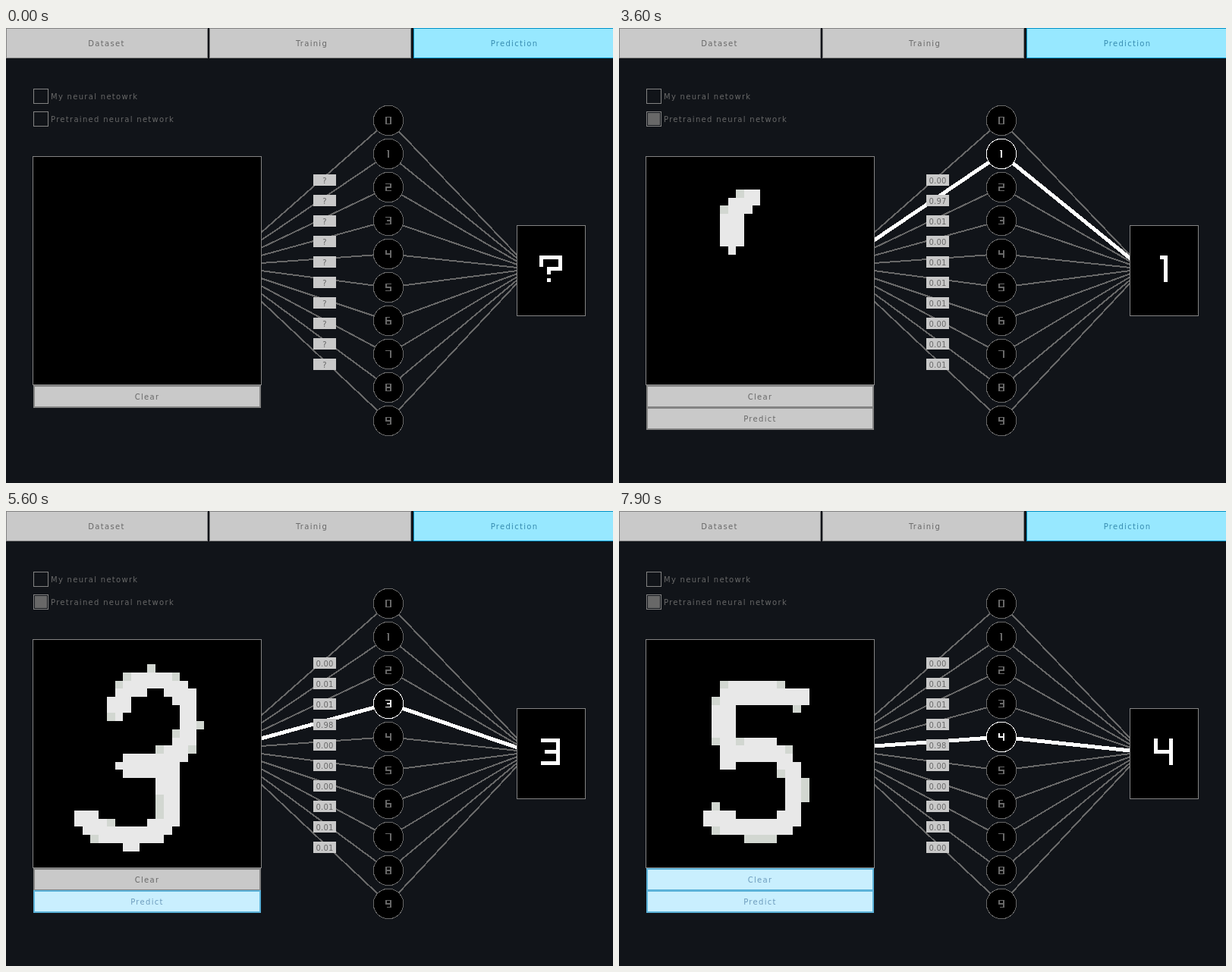
An HTML page with a canvas that plays this animation: 800 by 600 pixels, repeating every 8000 ms.

```html
<!DOCTYPE html>
<html lang="en">
<head>
<meta charset="utf-8">
<title>Digit prediction</title>
<style>
  html, body { margin: 0; width: 100%; height: 100%; overflow: hidden; background: #111419; }
  svg, canvas { position: absolute; left: 0; top: 0; display: block; }
  canvas { left: 36px; top: 170px; }
  text { font: 10px "DejaVu Sans", sans-serif; letter-spacing: 1.3px; fill: #686868; }
  .value { letter-spacing: 0.2px; }
  .mid { text-anchor: middle; }
  .control rect { fill: #c9c9c9; stroke: #838383; }
  .control.active rect { fill: #97e8ff; stroke: #0492c7; }
  .control.active text { fill: #368baf; }
  .control.hot rect { fill: #c9effe; stroke: #5bb2d9; }
  .hot text { fill: #6c9bbc; }
  .check .frame { fill: none; stroke: #838383; }
  .check .mark { fill: #686868; }
  .check.hot .frame { stroke: #5bb2d9; }
  .check.hot .mark { fill: #6c9bbc; }
  .panel { fill: #000; stroke: #838383; }
  .edge { fill: none; stroke: #686868; stroke-width: 2; }
  .edge.on { stroke: #fff; stroke-width: 5; }
  .node { fill: #000; stroke: #686868; }
  .glyph { fill: none; stroke: #686868; stroke-width: 1; }
  .on .node, .on .glyph, .result { stroke: #fff; }
  .tag { fill: #c9c9c9; }
</style>
</head>
<body>
<svg id="stage" width="800" height="600" viewBox="0 0 800 600" shape-rendering="crispEdges"></svg>
<canvas id="pad" width="300" height="300"></canvas>
<script>
const LOOP = 8000, STEP = 100, GRID = 28;
const stage = document.getElementById('stage');
const pen = document.getElementById('pad').getContext('2d');

// Square letterforms on a grid seven units high.
const GLYPHS = {
  0: 'M.5 .5H4.5V6.5H.5Z',
  1: 'M1 .5H2.5V7',
  2: 'M0 .5H4.5V3.5H.5V6.5H5',
  3: 'M0 .5H4.5V6.5H0M1 3.5H4.5',
  4: 'M.5 0V3.5H4.5M4.5 0V7',
  5: 'M5 .5H.5V3.5H4.5V6.5H0',
  6: 'M4 .5H.5V6.5H4.5V3.5H.5',
  7: 'M0 .5H4.5V7',
  8: 'M.5 .5H4.5V6.5H.5ZM.5 3.5H4.5',
  9: 'M4.5 3.5H.5V.5H4.5V6.5H1',
  '?': 'M.5 3V.5H5.5V3.5H2.5V5M2.5 6V7'
};

// Pen paths in grid cells; values are the outputs in hundredths.
const ROUNDS = [
  { draw: 1200, steps: 8, ease: 1, predict: 2100, erase: 2400,
    values: [98, 0, 1, 0, 0, 1, 1, 0, 1, 1],
    path: 'M11.4 6.5L10 6.8L8.5 8L7.3 10L7 13L7 17L7.7 18.8L9 20.2L11 21L17 21.2L19 20L20.5 18.4L21.2 15.5L21 11.5L19.5 8.5L16 6.5L12.5 6.2' },
  { draw: 2600, steps: 4, ease: 1, predict: 3100, erase: 3300,
    values: [0, 97, 1, 0, 1, 1, 1, 0, 1, 1],
    path: 'M11 9L14.5 6L14.5 22' },
  { draw: 3500, steps: 8, ease: 1.4, predict: 4400, erase: 4600,
    values: [0, 1, 99, 0, 1, 1, 1, 1, 0, 0],
    path: 'M10 9.8L10 7L11 5.6L12.1 4.8L15 4.3L17.5 5.5L18.3 8.5L16.5 13L12 18.5L9 21.5L20 21.5' },
  { draw: 4800, steps: 7, ease: 1, predict: 5600, erase: 5800,
    values: [0, 1, 1, 98, 0, 0, 0, 1, 1, 1],
    path: 'M9.8 8L10 7.2L11.5 5.3L14 4.3L16 4.8L18 6.2L18.5 8L18.65 10L18 12L16.6 14L11 15L15.8 15.3L16 17.5L16.4 20L16.2 21.8L15 23L11.5 23.9L8 23.1L6 21.6' },
  { draw: 6000, steps: 7, ease: 1, predict: 6800, erase: 7000,
    values: [0, 1, 1, 1, 98, 0, 0, 0, 1, 0],
    path: 'M10 6.3L9 14L19 14.3M17 6.3L16.5 23' },
  { draw: 7200, steps: 8, ease: 1, predict: 8000, erase: 8000, values: [],
    path: 'M18.2 6.7L16 6.3L14 6L9.5 6.1L9 8L9.1 11L9.6 14L12 13L14 12.7L16 13.8L17.2 15.5L17.65 17L17.6 20L17 21.8L15 22.7L12 22.7L9 22L7.8 21.3' }
];

const HOVER = {
  check: [[400, 900]],
  predict: [[2000, 2300], [3000, 3200], [4300, 4500], [5500, 5700], [6700, 6900], [7900, 8000]],
  clear: [[2300, 2600], [3200, 3400], [4500, 4700], [5700, 5900], [6900, 7100], [7900, 8000]]
};

function add(name, attrs, parent = stage, content = '') {
  const el = document.createElementNS('http://www.w3.org/2000/svg', name);
  for (const key in attrs) el.setAttribute(key, attrs[key]);
  el.textContent = content;
  if (parent) parent.appendChild(el);
  return el;
}

function control(x, y, width, height, border, label, labelX, kind = '') {
  const g = add('g', { class: 'control ' + kind });
  add('rect', { x: x + border / 2, y: y + border / 2, width: width - border,
    height: height - border, 'stroke-width': border }, g);
  add('text', { x: labelX, y: y + height / 2 + 4, class: 'mid' }, g, label);
  return g;
}

function checkbox(y, label) {
  const g = add('g', { class: 'check' });
  add('rect', { x: 36.5, y: y + .5, width: 19, height: 19, class: 'frame' }, g);
  const mark = add('rect', { x: 38, y: y + 2, width: 16, height: 16, class: 'mark', visibility: 'hidden' }, g);
  add('text', { x: 59, y: y + 14 }, g, label);
  return { g, mark };
}

function glyph(char, x, y, size, parent, kind = '') {
  return add('path', { d: GLYPHS[char], class: 'glyph ' + kind, 'aria-label': char,
    transform: `translate(${x} ${y}) scale(${size})` }, parent);
}

control(0, 0, 266, 40, 1, 'Dataset', 132.5);
control(268, 0, 266, 40, 1, 'Trainig', 403);
control(537, 0, 266, 40, 1, 'Prediction', 670, 'active');
checkbox(80, 'My neural netowrk');
const trained = checkbox(110, 'Pretrained neural network');

const edges = [], nodes = [], tags = [];
for (let i = 0; i < 10; i++) {
  edges.push(add('path', { d: `M336 ${270 + 10 * i}L504 ${122 + 44 * i}L674 ${300 + 4 * i}`, class: 'edge' }));
}
const glowEdge = add('path', { class: 'edge on' });
for (let i = 0; i < 10; i++) {
  const g = add('g', {}), y = 122 + 44 * i;
  add('circle', { cx: 504, cy: y, r: 19.8, class: 'node' }, g);
  glyph(i, 500.2, y - 5.3, 1.5, g);
  nodes.push(g);
  add('rect', { x: 405, y: 193 + 27 * i, width: 30, height: 15, class: 'tag' });
  tags.push(add('text', { x: 420, y: 205 + 27 * i, class: 'mid value' }));
}
add('rect', { x: 35.5, y: 169.5, width: 301, height: 301, class: 'panel' });
add('rect', { x: 673.5, y: 260.5, width: 90, height: 119, class: 'panel' });
const result = glyph('?', 703, 300, 5, stage, 'result');
const clearButton = control(36, 471, 300, 30, 2, 'Clear', 186);
const predictButton = control(36, 500, 300, 30, 2, 'Predict', 186);

for (const round of ROUNDS) {
  const line = add('path', { d: round.path }, null);
  const length = line.getTotalLength();
  round.points = Array.from({ length: 401 }, (_, i) => line.getPointAtLength(length * i / 400));
}

function paint(round, t) {
  pen.fillStyle = '#000';
  pen.fillRect(0, 0, 300, 300);
  if (!round) return;
  const part = Math.min(1, ((t - round.draw) / STEP + 1) / round.steps) ** round.ease;
  const points = round.points.slice(0, Math.ceil(part * 400) + 1);
  const left = c => Math.ceil(c * 300 / GRID - 1e-6);
  const top = r => Math.round(r * 300 / GRID);
  for (let r = 0; r < GRID; r++) {
    for (let c = 0; c < GRID; c++) {
      const gap = Math.min(...points.map(p => Math.hypot(p.x - c, p.y - r)));
      if (gap > 1.4) continue;
      pen.fillStyle = gap < 1.22 ? '#e8e8e8' : '#d2d7d1';
      pen.fillRect(left(c), top(r), left(c + 1) - left(c), top(r + 1) - top(r));
    }
  }
}

const hot = (name, t) => HOVER[name].some(([from, to]) => t >= from && t < to);

function render(t) {
  const ready = t >= 700;
  trained.g.classList.toggle('hot', hot('check', t));
  trained.mark.setAttribute('visibility', ready ? 'visible' : 'hidden');
  predictButton.setAttribute('visibility', ready ? 'visible' : 'hidden');
  predictButton.classList.toggle('hot', hot('predict', t));
  clearButton.classList.toggle('hot', hot('clear', t));

  const winner = ROUNDS.filter(r => t >= r.predict).length - 1;
  const known = winner >= 0;
  nodes.forEach((node, i) => node.classList.toggle('on', i === winner));
  tags.forEach((tag, i) => {
    tag.textContent = known ? (ROUNDS[winner].values[i] / 100).toFixed(2) : '?';
  });
  glowEdge.setAttribute('d', known ? edges[winner].getAttribute('d') : '');
  const char = known ? winner : '?';
  result.setAttribute('d', GLYPHS[char]);
  result.setAttribute('aria-label', char);
  result.setAttribute('transform', `translate(${!known ? 703 : winner === 1 ? 708 : 705} 300) scale(5)`);

  paint(ROUNDS.find(r => t >= r.draw && t < r.erase), t);
}

let shown = -1;
const begin = performance.now();
function tick() {
  const t = Math.floor((performance.now() - begin) % LOOP / STEP) * STEP;
  if (t !== shown) render(shown = t);
  requestAnimationFrame(tick);
}
tick();
</script>
</body>
</html>
```
